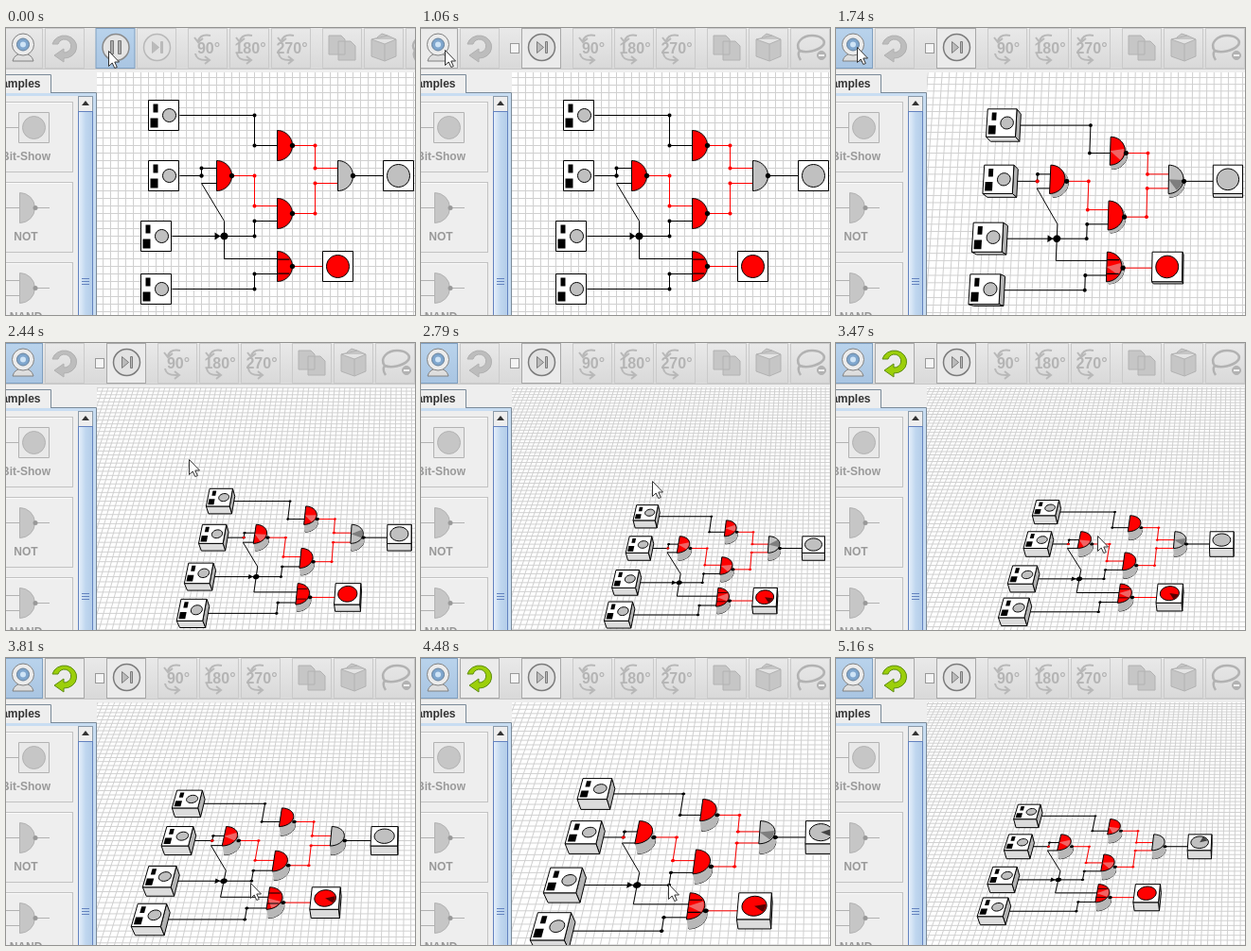
These frames come from a looping animation (432x304 px, 5680 ms). An HTML page with a canvas:

```html
<!DOCTYPE html>
<html lang="en">
<head>
<meta charset="utf-8">
<title>Logic circuit view</title>
<style>
html, body { margin: 0; width: 100%; height: 100%; overflow: hidden; background: #fff; }
canvas, svg { position: absolute; left: 0; top: 0; width: 432px; height: 304px; }
text { font-family: "Liberation Sans", Arial, sans-serif; font-weight: bold; font-size: 12px; fill: #999; }
.rot text { font-size: 16px; fill: #b4b4b4; text-anchor: middle; }
.side text { text-anchor: middle; }
.off { fill: #c6c6c6; stroke: #b2b2b2; }
.face { fill: url(#metal); stroke: #cacaca; }
.hot { fill: url(#blue); stroke: #7f9fc0; }
#ui:not(.run) #stepFace, .ready #reloadFace, .hover #camFace { fill: #ebebeb; stroke: #a8a8a8; }
.cam #camFace { fill: url(#blue); stroke: #7f9fc0; }
#pause, #ui.run #square { display: none; }
#ui.run #pause { display: inline; }
#ui:not(.run) #tools { transform: translateX(-32px); }
#reload { fill: #bdbdbd; stroke: #b0b0b0; }
.ready #reload { fill: #9ccf0a; stroke: #5d8c10; }
#step { color: #7b7b7b; }
.run #step { color: #b8b8b8; }
</style>
</head>
<body>
<canvas id="scene" width="432" height="304"></canvas>
<svg id="ui" viewBox="0 0 432 304">
  <defs>
    <linearGradient id="metal" x2="0" y2="1">
      <stop offset="0" stop-color="#e9e9e9"/><stop offset="1" stop-color="#d9d9d9"/>
    </linearGradient>
    <linearGradient id="blue" x2="0" y2="1">
      <stop offset="0" stop-color="#b9d3ec"/><stop offset="1" stop-color="#a9c5e2"/>
    </linearGradient>
    <linearGradient id="thumb">
      <stop offset="0" stop-color="#e8f1fb"/><stop offset=".5" stop-color="#c0d7ef"/><stop offset="1" stop-color="#b3cce8"/>
    </linearGradient>
    <rect id="btn" x="-20.500" y=".5" width="41" height="42"/>
    <path id="arrows" fill="none" stroke="#b8b8b8" stroke-width="2"
      d="M3 8q-11-2-13 6m-4-4l4 5 5-4M-13 27q1 8 14 7m-4-4l5 4-5 4"/>
    <g id="tile">
      <rect x="-28.500" y=".5" width="99" height="74" fill="#eee" stroke="#c2c2c2"/>
      <path d="M-27 73V1.500H69" fill="none" stroke="#fafafa"/>
    </g>
    <g id="gate">
      <path d="M14.500 11.500a16 16 0 0 1 0 32z" class="off"/>
      <path d="M33 27.500H46" stroke="#b2b2b2"/><circle cx="31" cy="27.500" r="2.500" fill="#999"/>
    </g>
  </defs>

  <path fill="#eee" d="M0 0H432V47H96V304H0z"/>
  <rect width="432" height="43" fill="url(#metal)"/>
  <path stroke="#c8c8c8" d="M0 43.500H432"/>

  <use id="camFace" class="face" href="#btn" x="18"/>
  <g stroke="#808080">
    <path d="M7 35q2-8 11-8t11 8z" fill="#dedede"/>
    <circle cx="18" cy="17.500" r="11.500" fill="#ececec"/>
    <circle cx="18" cy="17.500" r="6.500" fill="#7fa6cd" stroke="#66809a"/>
    <circle cx="18" cy="17.500" r="3" fill="#cfe4f6" stroke="none"/>
  </g>

  <use id="reloadFace" class="face" href="#btn" x="62"/>
  <path id="reload" d="M49 17a13 12 0 1 1 12 15v4l-10-7 10-7v4a7 7 0 1 0-6-9z"/>

  <rect id="square" x="94.500" y="16.500" width="9" height="10" fill="#f4f4f4" stroke="#999"/>
  <g id="pause">
    <use class="hot" href="#btn" x="115.500"/>
    <circle cx="116" cy="20.500" r="14" fill="#e4e4e4" stroke="#8a8a8a" stroke-width="1.500"/>
    <path d="M110.500 13.500h3v14h-3zM118.500 13.500h3v14h-3z" fill="#aaa" stroke="#777"/>
  </g>

  <g id="tools">
    <use id="stepFace" class="face" href="#btn" x="159"/>
    <g id="step" stroke="currentColor" fill="none">
      <circle cx="159.500" cy="20.500" r="14" fill="#e2e2e2" stroke-width="1.500"/>
      <path d="M154.500 14.500v12l7-6zM163.500 14.500h2v12h-2z" fill="#bbb"/>
    </g>
    <g class="rot">
      <use class="face" href="#btn" x="213"/><use href="#arrows" x="213"/><text x="214" y="27">90°</text>
      <use class="face" href="#btn" x="257"/><use href="#arrows" x="257"/><text x="258" y="27">180°</text>
      <use class="face" href="#btn" x="301"/><use href="#arrows" x="301"/><text x="302" y="27">270°</text>
    </g>
    <g class="face"><use href="#btn" x="355"/><use href="#btn" x="399"/><use href="#btn" x="443"/></g>
    <g class="off">
      <path d="M341 8h13l4 4v16h-17zM351 14h13l5 5v15h-18z"/>
      <path d="M386 12l17-4 9 4v18l-12 5-14-5zM386 12l14 5 12-5M400 17v18M392 10l5-4 6 2"/>
      <path fill="none" stroke-width="2.500" d="M432 24c-6-8 3-16 13-16s16 6 11 11-17 8-24 5q-3 4 1 10"/>
      <circle cx="455" cy="29" r="4.500" fill="#b2b2b2"/>
      <path d="M452 29h6" stroke="#eee" stroke-width="2"/>
    </g>
  </g>

  <path d="M-1 68.500V49.500H47.500V68.500" fill="#eee" stroke="#7a8a99"/>
  <text x="36.500" y="63" text-anchor="end" style="fill:#333">Examples</text>
  <path d="M47 68.500H95.500V304" fill="none" stroke="#7a8a99"/>
  <path d="M0 70.500H93.500V304" fill="none" stroke="#c8ddf2" stroke-width="3"/>

  <g class="side">
    <g transform="translate(0 78)">
      <use href="#tile"/>
      <path d="M0 27.500H13.500M13.500 11.500h32v32h-32z" fill="#e9e9e9" stroke="#b2b2b2"/>
      <circle cx="29.500" cy="27.500" r="12" class="off"/>
      <text x="21" y="62">Bit-Show</text>
    </g>
    <g transform="translate(0 163)">
      <use href="#tile"/><use href="#gate"/>
      <path d="M0 27.500H14" stroke="#b2b2b2"/><text x="21" y="62">NOT</text>
    </g>
    <g transform="translate(0 248)">
      <use href="#tile"/><use href="#gate"/>
      <path d="M0 19.500H14M0 35.500H14" stroke="#b2b2b2"/><text x="21" y="62">NAND</text>
    </g>
  </g>

  <rect x="76.500" y="72.500" width="15" height="240" fill="#eee" stroke="#8b9aa9"/>
  <path d="M80 82h8l-4-5z" fill="#333"/>
  <rect x="76.500" y="88.500" width="15" height="230" fill="url(#thumb)" stroke="#6382bf"/>
  <path d="M80 265.500h8m-8 3h8m-8 3h8" stroke="#6382bf"/>

  <path id="cursor" d="M.5.5V16.500l3.700-3.500 2.600 5.500 2.500-1-2.500-5.500H11.500z" fill="#fff" stroke="#333"/>
</svg>
<script>
const $ = id => document.getElementById(id);
const ctx = $('scene').getContext('2d');
const RED = '#f00', GRAY = '#c0c0c0', BLACK = '#000';
const LOOP = 5680, BEAT = 344, LAST = 15;
const CX = 430, CY = 240, FOCUS = 830, HALF = 8;

// beat, tilt in degrees, dolly, pan x, pan y
const cameraKeys = [
  [4, 0, 1, 0, 0], [5, 10, 1, 1, 0], [7, 35.5, 1, 3, 0], [9, 46, 1, 8, 0],
  [11, 40, 1.2, 19, 27], [13, 38, 1.337, -8, 16], [14, 44, 1.122, 44, 42]
];
// beat, x, y
const pointerKeys = [
  [0, 108, 24], [1, 77, 69], [2, 27, 25], [4, 22, 20], [6, 22, 20],
  [7, 193, 123], [9, 294, 169], [11, 258, 238], [13, 261, 239]
];

const mix = (a, b, t) => a + (b - a) * t;
const rand = n => { const v = Math.sin(n * 12.9898) * 43758.5453; return v - Math.floor(v); };

function keyed(keys, beat) {
  const next = keys.findIndex(k => k[0] > beat);
  if (next === 0) return keys[0].slice(1);
  if (next < 0) return keys[keys.length - 1].slice(1);
  const a = keys[next - 1], b = keys[next], t = (beat - a[0]) / (b[0] - a[0]);
  return a.slice(1).map((v, i) => mix(v, b[i + 1], t));
}

const gate = (x, y, color, pins = 8) => ({ x, y, color, up: [x, y - pins], down: [x, y + pins], out: [x + 16, y] });
const gates = [
  gate(286, 124, RED, 0), gate(222, 156, RED), gate(286, 196, RED), gate(350, 156, GRAY), gate(286, 252, RED)
];
const [invert, left, middle, right, low] = gates;
const inputs = [[150, 76], [150, 140], [142, 204], [142, 260]];
const lamps = [[414, 156, GRAY], [350, 252, RED]];

let cam, beat;

function setCamera() {
  const [tilt, dolly, panX, panY] = keyed(cameraKeys, beat);
  const a = tilt * Math.PI / 180, cos = Math.cos(a);
  cam = {
    cos, sin: Math.sin(a), flat: tilt === 0, depth: FOCUS / (cos * dolly),
    col: CX + panX, row: 374 - 134 / cos + panY
  };
}

function project([x, y], z = 0) {
  const h = cam.flat ? 0 : z * HALF, dy = y - cam.row;
  const s = FOCUS / (cam.depth - dy * cam.sin - h * cam.cos);
  return [CX + (x - cam.col) * s + .5, CY + (dy * cam.cos - h * cam.sin) * s + .5];
}

function paint(pts, fill, line, closed = true) {
  ctx.beginPath();
  pts.forEach(p => ctx.lineTo(...p));
  if (closed) ctx.closePath();
  if (fill) { ctx.fillStyle = fill; ctx.fill(); }
  if (line) { ctx.strokeStyle = line; ctx.stroke(); }
}
const shape = (pts, z, fill, line) => paint(pts.map(p => project(p, z)), fill, line);
const path = (pts, color) => paint(pts.map(p => project(p)), null, color, false);

const rect = (x, y, w, h) => [[x, y], [x + w, y], [x + w, y + h], [x, y + h]];
const arc = (x, y, r, from = 0, to = 2 * Math.PI) => Array.from({ length: 25 }, (_, i) => {
  const a = mix(from, to, i / 24);
  return [x + r * Math.cos(a), y + r * Math.sin(a)];
});
const dot = (x, y, r, color = BLACK) => shape(arc(x, y, r), 0, color);

// two coplanar surfaces fighting for a patch of the disc
function flicker(x, y, r, seed, from, span, color) {
  if (cam.flat || rand(beat + seed * 17) > .5) return;
  const a = from + span * rand(beat * 3 + seed);
  shape([[x, y], ...arc(x, y, r, a, a + .9)], 1, color);
}

function box(x, y) {
  const top = rect(x, y, 32, 32);
  const side = (a, b, fill) => paint([project(a, 1), project(b, 1), project(b, -1), project(a, -1)], fill, BLACK);
  if (!cam.flat) {
    side(top[1], top[2], '#b4b4b4');
    side(top[2], top[3], '#dcdcdc');
  }
  shape(top, 1, '#fff', BLACK);
}

function link([x1, y1], [x2, y2], color = BLACK, bend = x1 + 24) {
  path([[x1, y1], [bend, y1], [bend, y2], [x2, y2]], color);
  dot(bend, y1, 2, color);
  dot(bend, y2, 2, color);
}

function drawGrid() {
  for (let x = -338; x < 640; x += 8) path([[x, -404], [x, 400]], '#d0d0d0');
  for (let y = -404; y < 400; y += 8) path([[-340, y], [640, y]], '#d0d0d0');
}

function drawWires() {
  const [a, b, c, d] = inputs.map(([x, y]) => [x + 33, y + 16]);
  link(a, invert.up, BLACK, 262);
  link(b, left.up, BLACK, 206);
  link(c, middle.down, BLACK, 262);
  link(d, low.down, BLACK, 262);
  path([left.down, [206, 164], [230, 204], [230, 244], low.up], BLACK);
  path([right.out, [398, 156]], BLACK);
  link(left.out, middle.up, RED);
  link(invert.out, right.up, RED);
  link(middle.out, right.down, RED);
  path([low.out, [334, 252]], RED);
  dot(206, 156, 2, cam.flat ? BLACK : RED);
  dot(230, 220, 4);
  shape([[220, 216], [226, 220], [220, 224]], 0, BLACK);
}

function drawGate({ x, y, color }, i) {
  const face = arc(x, y, 16, -Math.PI / 2, Math.PI / 2);
  if (!cam.flat) {
    shape(face, -1, '#b8b8b8', BLACK);
    for (let z = -1; z < 1; z += .1) shape(face, z, '#b8b8b8');
  }
  shape(face, 1, color, BLACK);
  flicker(x, y, 15, i, -.6, 1, color === RED ? 'rgba(225,200,200,.5)' : 'rgba(60,60,60,.5)');
  dot(x + 16, y, 2.7);
}

function drawInput([x, y]) {
  box(x, y);
  shape(rect(x + 5, y + 4, 5, 9), 1, BLACK);
  shape(rect(x + 2, y + 19, 8, 10), 1, BLACK);
  shape(arc(x + 22, y + 16, 7), 1, GRAY, BLACK);
}

function drawLamp([x, y, color], i) {
  box(x - 16, y - 16);
  shape(arc(x, y, 12), 1, color, BLACK);
  flicker(x, y, 11, i + 5, -1.8, 2, 'rgba(0,0,0,.65)');
}

function drawScene() {
  setCamera();
  ctx.fillStyle = '#fff';
  ctx.fillRect(0, 0, 432, 304);
  drawGrid();
  drawWires();
  inputs.forEach(drawInput);
  gates.forEach(drawGate);
  [-8, 7].forEach(dy => shape(rect(low.x, low.y + dy, 13, 1.2), 1, BLACK));
  lamps.forEach(drawLamp);
}

function drawControls() {
  const [x, y] = keyed(pointerKeys, beat);
  $('cursor').setAttribute('transform', `translate(${Math.round(x)} ${Math.round(y)})`);
  $('cursor').style.display = beat === LAST ? 'none' : '';
  const state = { run: beat < 1, hover: beat > 1 && beat < 5, cam: beat > 4, ready: beat > 8 };
  for (const key in state) $('ui').classList.toggle(key, state[key]);
}

const start = performance.now();
function tick(now) {
  const t = Math.max(0, now - start) % LOOP;
  const n = Math.min(LAST, Math.floor(t / BEAT));
  if (n !== beat) {
    beat = n;
    drawScene();
    drawControls();
  }
  requestAnimationFrame(tick);
}
tick(start);
</script>
</body>
</html>
```
